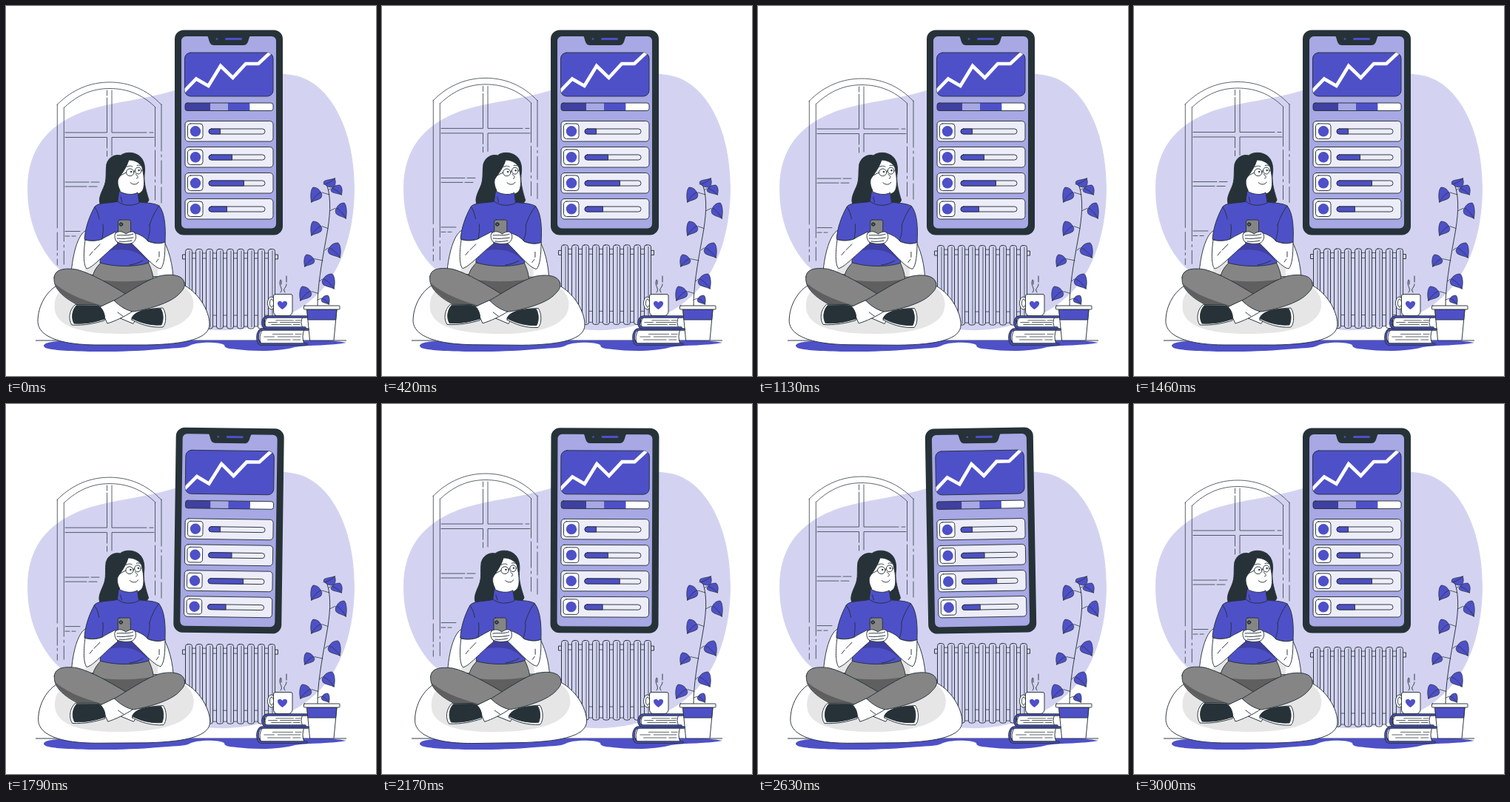
These frames come from a looping animation (500 px wide and 500 px high, 3040 ms). An HTML page:

```html
<!DOCTYPE html>
<html lang="en">
<head>
<meta charset="utf-8">
<title>Relaxing with a phone</title>
<style>
html, body { margin: 0; width: 100%; height: 100%; overflow: hidden; background: #fff; }
svg { display: block; width: 100vw; height: 100vh; }
g { stroke-linecap: round; stroke-linejoin: round; }
.o { stroke: #263238; stroke-width: .95; }
.n { fill: none; }
.w { fill: #fff; }
.p { fill: #4e50c8; }
.d { fill: #263238; }
.l { fill: #a7a8e4; }
.thin { stroke-width: .75; }
</style>
</head>
<body>
<svg viewBox="0 0 500 500">
  <defs>
    <clipPath id="chart"><rect x="241.5" y="63" width="119.5" height="59" rx="8"/></clipPath>
    <clipPath id="strip"><rect x="242" y="131" width="119" height="10.5" rx="3"/></clipPath>
  </defs>

  <path fill="#d3d3f1" d="M228 114C290 97 340 86 385 93C436 99 471 165 471 245C471 320 445 370 415 395C385 422 335 440 285 438C200 435 120 400 66 350C40 320 29 285 29 247C29 192 58 158 112 140C148 129 190 126 228 114Z"/>

  <g id="room">
    <g class="o n thin">
      <path d="M69 133.500C90 112 115 103 140 103C165 103 190 112 210 133.500M79 137C98 119 118 111.500 140 111.500C163 111.500 184 119 202 137"/>
      <path d="M69.300 133V300M69.300 306V330M69.300 334V337M69.300 342V350M78.300 137V318M78.300 323V326M78.300 331V349"/>
      <path d="M210 133V196M210 201V204M210 209V240M210 245V266M201.500 137V190M201.500 195V230M201.500 235V238M201.500 243V262"/>
      <path d="M136.500 114V121M136.500 124V171H80M143 114V171H190M194 171H199M80 177.500H136.500V192M136.500 196V203M200 177.500H143V202"/>
      <path d="M80 238H112M115 238H126M80 244H109M112 244H123M80 304.500H100M80 311H86M89 311H94"/>
    </g>
    <g id="radiator" class="o n"></g>
  </g>

  <path class="o n" d="M40 452H460"/>
  <path class="p" d="M51 459C52 453 75 452 92 453L250 452H430C444 452 453 454 460 455C440 459 410 458 390 461C370 467 335 467 312 464C300 463 295 462 295 458C286 453 256 454 248 459C240 463 225 462 205 464C150 469 80 467 62 464C54 463 51 461 51 459Z"/>

  <g id="phone">
    <rect class="d" x="228" y="32.500" width="146" height="277" rx="12"/>
    <rect class="l" x="237" y="41" width="128" height="259.500" rx="6"/>
    <path class="d" d="M271 40C275 41 273 53 281 53H321C329 53 327 41 331 40Z"/>
    <circle class="p" cx="285" cy="44.500" r="1.300"/>
    <rect class="p" x="296" y="43" width="23" height="3" rx="1.500"/>
    <rect class="o p" x="241.500" y="63" width="119.500" height="59" rx="8"/>
    <path clip-path="url(#chart)" fill="none" stroke="#fff" stroke-width="4.600" stroke-linejoin="miter" d="M240 116L257 98.500L273.500 108L290 81L306.500 97L324 78H341L357 63"/>
    <g clip-path="url(#strip)">
      <path fill="#3f40a0" d="M242 131h34v11h-34z"/>
      <path class="l" d="M276 131h24v11h-24z"/>
      <path class="p" d="M300 131h29.500v11h-29.500z"/>
      <path class="w" d="M329.500 131h32v11h-32z"/>
    </g>
    <rect class="o n" x="242" y="131" width="119" height="10.500" rx="3"/>
    <g id="cards"></g>
  </g>

  <g id="plant" class="o">
    <path class="n" d="M421 405C421 380 426 350 433 312C438 285 440 262 434 243"/>
    <g id="leaves"></g>
    <path class="w" d="M407 410H447L443 452H411Z"/>
    <path class="p" d="M407 410H447L445.700 424H408.300Z"/>
    <rect class="w" x="402.500" y="405" width="48.500" height="5" rx=".8"/>
  </g>

  <g id="books" class="o"></g>

  <g class="o">
    <path class="n" d="M371 387C376 382 367 378 371 370M377 387C373 382 379 381 379 376M379 373V365M372 376V371"/>
    <ellipse class="w" cx="358.500" cy="401.500" rx="5" ry="8.500"/>
    <ellipse class="w" cx="359" cy="401.500" rx="2.600" ry="5.500"/>
    <path class="w" d="M364 389.500H385Q387 389.500 387 392V412Q387 418.500 381 418.500H367Q361.500 418.500 361.500 412V392Q361.500 389.500 364 389.500Z"/>
    <path class="p" stroke="none" d="M373.500 410C369 407 366.500 404 367 401C368 398 372 398 373.500 401C375 398 379 398 380 401C380.500 404 378 407 373.500 410Z"/>
  </g>

  <g id="person" class="o">
    <!-- bean bag -->
    <path class="w" d="M88 362C90 335 97 310 107 304H205C217 320 224 340 226 366Z"/>
    <path fill="#e6e6e6" stroke="none" d="M107 362C106 352 110 345 120 342L205 345V365Z"/>
    <path class="w" d="M72 376C55 384 43 405 43 426C43 442 62 458 125 458H190C245 457 275 449 275 430C275 412 260 386 238 376Z"/>
    <path fill="#e6e6e6" stroke="none" d="M66 400C62 425 82 442 150 443C228 444 256 425 253 399C251 385 240 377 225 375L85 378C72 383 67 392 66 400Z"/>

    <!-- hips and crossed legs -->
    <path fill="#858585" d="M128 347C120 355 116 363 117 372L155 394L199 375C200 363 195 352 192 346Z"/>
    <path fill="#5f5f5f" stroke="none" d="M118 368C140 374 178 373 196 369L190 380L155 397Z"/>
    <path class="w" d="M134 413L150 397L184 410L172 429Z"/>
    <path class="w" d="M170 424C172 414 186 409 212 408C217 415 217 429 212 434C195 435 181 430 170 424Z"/>
    <path class="d" d="M170 422C172 414 186 409 209 409C213 415 213 425 210 431C195 432 181 428 170 422Z"/>
    <path fill="#858585" d="M65 367C66 355 80 354 95 356C116 361 143 378 165 391L140 414C115 414 82 401 69 382C65 376 65 371 65 367Z"/>
    <path fill="#5f5f5f" stroke="none" d="M66 375C85 392 112 400 144 409L140 413.500C115 413 82 400 69 381Z"/>
    <path class="w" d="M146 398L172 412C160 420 147 426 137 429L127 407Z"/>
    <path class="w" d="M93 404C85 411 84 424 89 431C105 432 120 429 133 425C135 418 130 406 123 404Z"/>
    <path class="d" d="M95 405C89 411 88 422 92 429C108 430 121 427 133 423C134 417 130 406 123 405Z"/>
    <path fill="#858585" d="M241 374C239 362 220 362 207 365C190 370 165 387 146 398C154 406 164 412 172 413C197 409 225 400 235 388C241 382 242 378 241 374Z"/>
    <path class="n" d="M151 414C154 416 156 418 158 419"/>

    <!-- hair, face, collar -->
    <path class="d" d="M136 214C138 204 148 200 155 202C162 196 178 197 184 207C188 213 188 222 187 228C186 240 190 252 193 262C192 267 185 269 181 267L176 252H156L153 265C147 273 133 275 128 269C124 262 128 254 132 245C137 234 134 225 136 214Z"/>
    <path class="w" d="M152 233C157 226 163 218 166 208C175 208 182 213 184 218L186 229C187 238 187 246 184 250C181 254 177 253 176 258H154V249C151 243 150 237 152 233Z"/>
    <g class="n">
      <ellipse cx="167.700" cy="224.800" rx="5.200" ry="4.900"/>
      <ellipse cx="178.700" cy="222.500" rx="4.300" ry="4.500"/>
      <path d="M172.700 223.500L174.500 222.500M162.500 225L153 230M163 217.500C166 215.500 169 216 171 217M177 215.500C179 214.500 181 215 182 216M175 227C178 230 180 232 176.500 233M168 238.500C171 242 177 242 179 238"/>
    </g>
    <circle class="d" cx="169" cy="224" r=".8"/><circle class="d" cx="179.500" cy="222" r=".8"/>

    <!-- sweater, arms, device -->
    <path class="p" d="M152 264C140 267 126 265 120 271C112 285 107 301 106 315C112 318 122 318 130 315L127 347C148 353 175 353 193 347L191 317C200 321 209 322 215 319C216 300 215 280 207 270C200 266 188 266 180 265Z"/>
    <path class="p" d="M153 250C160 255 172 256 178 252L180 266C170 271 158 270 151 264Z"/>
    <path class="n" d="M120 272C124 278 125 283 126 288M207 270C200 279 197 287 194 296M130 315C131 307 132 302 131 295M191 317C194 309 195 302 194 296M155 258L157 265M167 350C174 349 180 347 185 344"/>
    <path fill="#3f40a0" stroke="none" d="M146 321L137 331C155 328 176 327 190 344L191 317L172 308Z"/>
    <path class="w" d="M107 316C105 330 104 350 109 355C117 354 132 336 151 321L148 305C141 309 134 312 130 315C122 318 113 318 107 316Z"/>
    <path class="w" d="M215 319C215 335 214 350 209 355C200 354 184 334 169 320L172 306C182 309 188 313 192 318C200 321 208 322 215 319Z"/>
    <path class="n" d="M113 337L117 332M119 330L127 322M207 332V339M206 342L203 346"/>
    <rect fill="#858585" x="151.500" y="289" width="17" height="22" rx="2.500"/>
    <circle class="d" cx="155.500" cy="295" r="2.300"/><circle class="l" stroke="none" cx="155.500" cy="295" r=".8"/>
    <path class="w" d="M148 307C153 303 158 305 162 308C167 305 172 303 175 308C177 314 174 320 168 321C160 322 153 321 149 318C147 314 146 310 148 307Z"/>
    <path class="n" d="M150 310C157 309 165 311 172 308M150 314C157 315 166 314 172 313M153 318C159 319 165 318 170 317"/>
  </g>
</svg>
<script>
const $ = id => document.getElementById(id);
const repeat = (id, list, draw) => $(id).innerHTML = list.map(draw).join('');

repeat('radiator', [...Array(9).keys()], i => {
  const x = 247 + i * 14;
  const link = i < 8 ? `<path class="thin" d="M${x + 4.5} 334h5M${x + 4.5} 341h5M${x + 4.5} 418h5M${x + 4.5} 433h5"/>` : '';
  return `<rect x="${x - 4.5}" y="328.500" width="9" height="107.500" rx="3"/>
    <path class="thin" d="M${x + 1} 331V434"/>${link}`;
});
$('radiator').innerHTML += '<path d="M242 336h-3.500v6h3.500M364 336h3.500v6h-3.500M242 417h-3.500v5h3.500M364 417h3.500v5h-3.500"/>';

repeat('cards', [16, 32, 48, 25], (fill, i) => `
  <g class="o" transform="translate(0 ${i * 35})">
    <rect fill="#ededfa" x="242" y="155.500" width="119" height="27.500" rx="4.500"/>
    <rect class="w" x="245.500" y="159" width="20.500" height="20.500" rx="4"/>
    <circle class="p" stroke="none" cx="256" cy="169.300" r="7.200"/>
    <rect fill="#ededfa" x="274" y="166" width="76" height="7" rx="3.500"/>
    <path class="p" d="M277.500 166H${273.5 + fill}V173H277.500A3.500 3.500 0 0 1 277.500 166Z"/>
  </g>`);

// Leaf box: left, top, width, height, side (1 = tip on the right), x of the stem
repeat('leaves', [
  [429, 245, 16, -12, 1, 434], [439, 242, 15, 13, 1, 436], [412, 245, 15, 20, 0, 437],
  [445, 266, 15, 21, 1, 438], [412, 291, 15, 19, 0, 435], [435, 320, 17, 20, 1, 431],
  [403, 336, 14, 16, 0, 428], [427, 362, 17, 20, 1, 424], [397, 379, 16, 19, 0, 422],
  [426, 391, 11, 12, 1, 421]
], ([x, y, w, h, right, stem]) => `
  <path class="n thin" d="M${right ? x : x + w} ${y + h * .35}L${stem} ${y + h * .5}"/>
  <g transform="translate(${right ? x + w : x} ${y}) scale(${right ? -w : w} ${h})">
    <path class="p thin" vector-effect="non-scaling-stroke" d="M.05 1C-.08 .6 0 .1 .2 0C.5 0 .75 .12 .85 .3C1.02 .4 1.02 .6 .9 .72C.7 .85 .35 .88 .05 1Z"/>
    <path class="n thin" vector-effect="non-scaling-stroke" d="M.9 .33C.65 .42 .3 .65 .05 1"/>
  </g>`);

repeat('books', [[340, 437, 68, 20], [347, 420, 59, 15]], ([x, y, w, h]) => {
  const cover = `M${x + w} ${y}H${x + 7}C${x - 2} ${y} ${x - 2} ${y + h} ${x + 5} ${y + h}H${x + w - 2}`;
  const line = (from, to, at) => `M${x + from * w} ${y + at * h}H${x + to * w}`;
  return `
  <path class="w" d="M${x + 7} ${y}H${x + w - 5}Q${x + w - 9} ${y + h / 2} ${x + w - 5} ${y + h}H${x + 5}Q${x} ${y + h / 2} ${x + 7} ${y}Z"/>
  <path class="n thin" d="${line(.3, .7, .32)}${line(.75, .87, .32)}${line(.13, .33, .5)}${line(.4, .85, .5)}${line(.2, .65, .7)}${line(.7, .85, .7)}"/>
  <path class="n" stroke-width="1" style="stroke-width:3.600" d="${cover}"/>
  <path class="n" style="stroke:#4e50c8;stroke-width:1.700" d="${cover}"/>`;
});

// One sway: 0 to +1 to -1 and back to 0 degrees, in straight ramps
const sway = p => p < .25 ? 4 * p : p < .75 ? 2 - 4 * p : 4 * p - 4;
const turn = (id, angle, x, y) => $(id).setAttribute('transform', `rotate(${angle} ${x} ${y})`);

function draw(now) {
  const t = Math.min(now % 3040, 3000);
  const rise = 10 * (1 - Math.abs(1 - t % 1500 / 750));
  $('room').setAttribute('transform', `translate(0 ${-rise})`);
  turn('person', sway(t / 3000), 159, 328);
  turn('phone', t < 1500 ? 0 : sway(t / 1500 - 1), 301, 171);
}

const start = performance.now();
function tick() {
  draw(performance.now() - start);
  requestAnimationFrame(tick);
}
tick();
</script>
</body>
</html>
```
